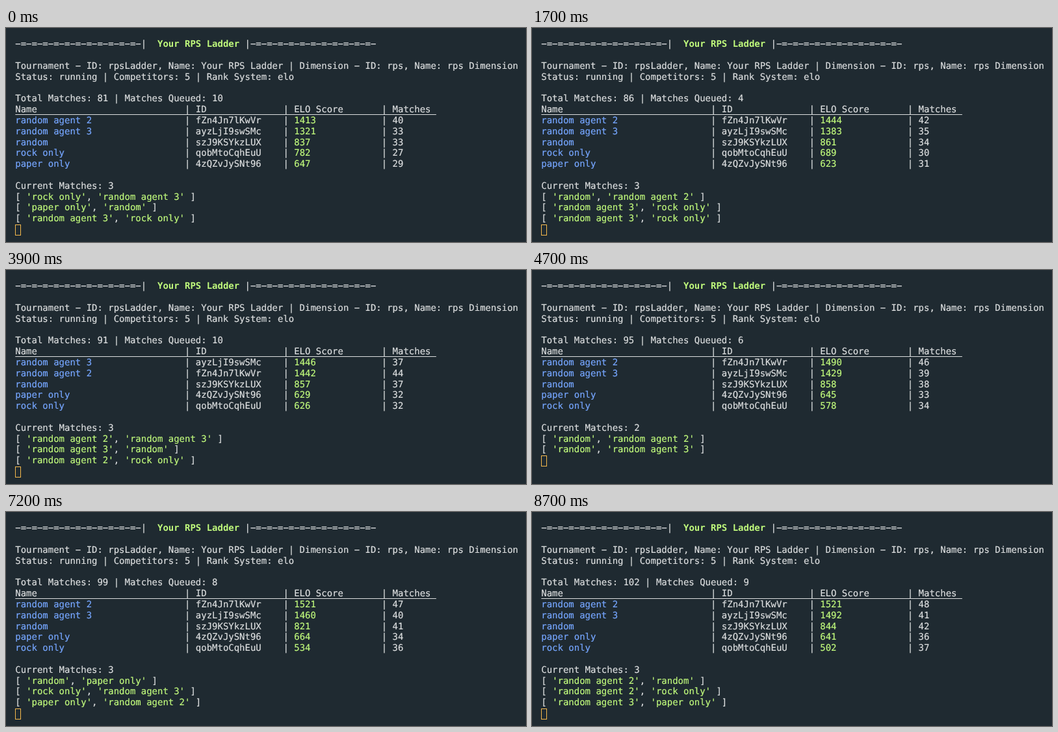
These frames come from a looping animation (800x330 px, 8.9 s). An HTML page:

```html
<!DOCTYPE html>
<html lang="en">
<head>
<meta charset="utf-8">
<title>RPS Ladder</title>
<style>
  html, body { margin: 0; width: 100%; height: 100%; overflow: hidden; background: #1f2a31; }
  pre {
    position: absolute; left: 14.3px; top: 17.2px; margin: 0;
    font: 13.97px/16.82px "DejaVu Sans Mono", monospace;
    text-rendering: geometricPrecision;
    -webkit-text-stroke: 0.2px;
    color: #dcdedf;
  }
  b, i { color: #c0fa7c; font-style: normal; }
  b { -webkit-text-stroke: 0; }
  em { color: #76a6ff; font-style: normal; }
  u { text-decoration: underline 1px; text-underline-offset: 3px; text-decoration-skip-ink: none; }
  #cursor {
    position: absolute; left: 14px; width: 9px; height: 17px;
    box-sizing: border-box; border: 1px solid #f5b94c;
  }
</style>
</head>
<body>
<pre id="screen"></pre>
<div id="cursor"></div>
<script>
const LOOP = 8900;
const TOP = 17.2, LINE = 16.82;
const DASH = '\u2212'; // wide dash, level with the equals sign

// Starting ladder: name, id, score, matches played
const START = {
  A: ['random agent 2', 'fZn4Jn7lKwVr', 1413, 40],
  B: ['random agent 3', 'ayzLjI9swSMc', 1321, 33],
  R: ['random', 'szJ9KSYkzLUX', 837, 33],
  K: ['rock only', 'qobMtoCqhEuU', 782, 27],
  P: ['paper only', '4zQZvJySNt96', 647, 29]
};

// Screen updates: time, finished matches (winner, loser, points), queue length, running pairs
const UPDATES = [
  [0, '', 10, 'KB PR BK'],
  [100, 'BK31', 10, 'PR BK'],
  [600, 'RP24 BK31', 7, 'AP KA'],
  [1500, 'AP0 AK31', 4, 'RA BK BK'],
  [2700, 'BK31 RA1', 9, 'BK RP RA'],
  [3300, 'BK32', 9, 'RP RA'],
  [3900, 'PR6 RA1', 10, 'AB BR AK'],
  [4500, 'AB16 RB1 AK32 PK16', 6, 'RA RB'],
  [5700, 'AR31 BR31', 3, 'PK RK RP'],
  [6300, 'PK19', 3, 'RK RP'],
  [6900, 'RK25', 8, 'RP KB PA'],
  [7500, 'RP23 BK32 AP0', 9, 'AR AK BP']
];

const list = text => text.split(' ').filter(Boolean);
const paint = (tag, text) => `<${tag}>${text}</${tag}>`;

function tableRow([name, id, score, played], nameTag, scoreTag) {
  const cell = (value, width, tag) => {
    const text = String(value).padEnd(width);
    return tag ? paint(tag, text) : text;
  };
  return cell(name, 31, nameTag) + '| ' + cell(id, 16) + '| ' +
    cell(score, 16, scoreTag) + '| ' + cell(played, 8);
}

function render(players, total, queued, running) {
  const rule = `${DASH}=`.repeat(11) + DASH;
  const ranked = Object.values(players).sort((a, b) => b[2] - a[2]);
  const quote = key => paint('i', `'${players[key][0]}'`);
  return [
    `${rule}|  ${paint('b', 'Your RPS Ladder')} |${rule}`,
    '',
    `Tournament ${DASH} ID: rpsLadder, Name: Your RPS Ladder | Dimension ${DASH} ID: rps, Name: rps Dimension`,
    'Status: running | Competitors: 5 | Rank System: elo',
    '',
    `Total Matches: ${total} | Matches Queued: ${queued}`,
    paint('u', tableRow(['Name', 'ID', 'ELO Score', 'Matches'])),
    ...ranked.map(player => tableRow(player, 'em', 'i')),
    '',
    `Current Matches: ${running.length}`,
    ...running.map(([a, b]) => `[ ${quote(a)}, ${quote(b)} ]`)
  ];
}

function buildScreens() {
  const players = structuredClone(START);
  let total = 81;
  return UPDATES.map(([time, finished, queued, running]) => {
    for (const [winner, loser, ...digits] of list(finished)) {
      const points = Number(digits.join(''));
      players[winner][2] += points;
      players[loser][2] -= points;
      players[winner][3]++;
      players[loser][3]++;
      total++;
    }
    return { time, lines: render(players, total, queued, list(running)) };
  });
}

const screens = buildScreens();
const screenEl = document.getElementById('screen');
const cursorEl = document.getElementById('cursor');
let shown;

function draw() {
  const now = performance.now() % LOOP;
  const current = screens.findLast(screen => screen.time <= now);
  if (current !== shown) {
    shown = current;
    screenEl.innerHTML = current.lines.join('\n');
    cursorEl.style.top = Math.floor(TOP + current.lines.length * LINE) + 'px';
  }
  requestAnimationFrame(draw);
}
draw();
</script>
</body>
</html>
```
